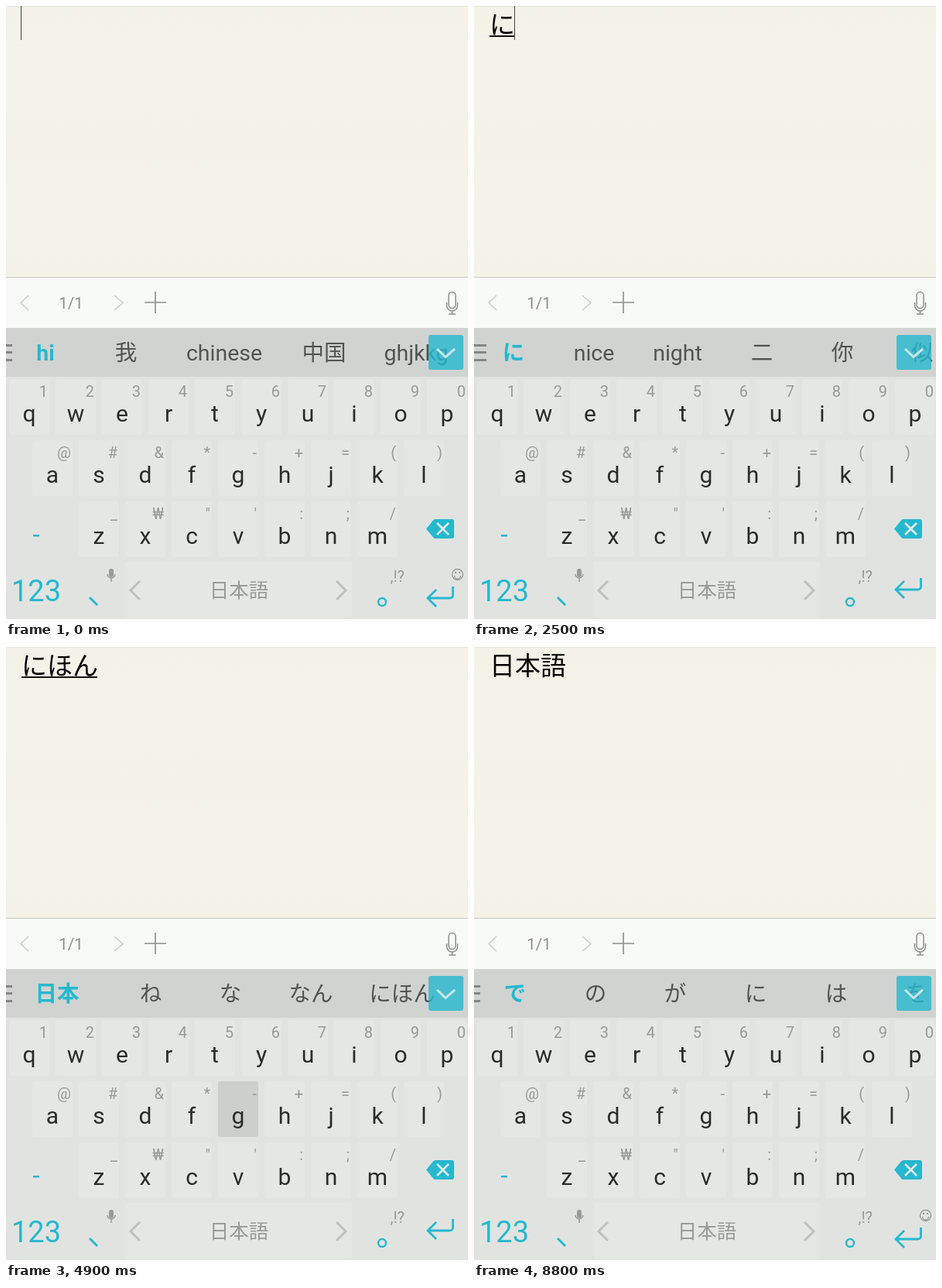
These frames come from a looping animation (597 px wide and 792 px high, 8.9 s). An HTML page with a canvas:

```html
<!DOCTYPE html>
<html lang="ja">
<head>
<meta charset="utf-8">
<title>Japanese keyboard</title>
<style>
html, body { margin: 0; width: 100%; height: 100%; overflow: hidden; }
canvas { display: block; }
</style>
</head>
<body>
<canvas width="597" height="792"></canvas>
<script>
const ctx = document.querySelector('canvas').getContext('2d');
const LOOP = 8900;
const FONT = 'Roboto, "Noto Sans CJK JP", sans-serif';
const TEAL = '#25b8cf', PALE = '#e3f1f2', GRAY = '#989a98', INK = '#2a2c2a';

// [time, value]: each value holds until the next entry
const typed = [[0, ''], [500, 'ん'], [1400, 'に'], [2900, 'にh'], [3600, 'にほ'], [4300, 'にほん'],
  [5100, 'にほんg'], [6000, 'にほんご'], [7300, '日本語']];
const candidates = [
  [0, 'hi 51 我 155 chinese 282 中国 411 ghjkkg 530'],
  [700, 'ん 53 no 158 not 261 n 366 な 469 ね 573'],
  [1500, 'に 51 nice 155 night 263 二 372 你 476 似 579'],
  [3100, '日本 66 ね 187 な 290 なん 394 ニh 499 にh 605'],
  [3700, '日本 66 ね 187 な 290 なん 394 にほ 499 ニほ 605'],
  [4400, '日本 66 ね 187 な 290 なん 394 にほん 512'],
  [5200, 'ね 53 な 159 なん 263 に 367 ニほんg 496 にほんg 646'],
  [6100, '日本語 80 ね 214 な 317 なん 421 にほんご 553'],
  [7400, 'で 53 の 157 が 260 に 364 は 468 を 572']];
const menuRight = [[0, 8], [700, 16], [3100, 8]];
// key, pressed, popup shown, released
const presses = [['n', 300, 400, 600], ['i', 1300, 1300, 1500], ['h', 2700, 2800, 3000], ['o', 3400, 3500, 3700],
  ['n', 4100, 4200, 4400], ['g', 4900, 5000, 5200], ['o', 5800, 5900, 6100]];
const caretToggles = [1000, 1400, 1900, 2400, 3400, 3600, 4100, 4300, 4700, 5100, 5500,
  6000, 6400, 6900, 7800, 8300, 8800];

const rows = [
  { x: 4, y: 482, keys: 'qwertyuiop', hints: '1234567890' },
  { x: 34, y: 561, keys: 'asdfghjkl', hints: '@#&*-+=()' },
  { x: 94, y: 640, keys: 'zxcvbnm', hints: '_₩"\':;/' }];

const valueAt = (track, t) => track.filter(([start]) => start <= t).pop()[1];

function rect(x, y, w, h, color, radius = 0) {
  ctx.fillStyle = color;
  ctx.beginPath();
  ctx.roundRect(x, y, w, h, radius);
  ctx.fill();
}

function text(string, x, y, size, color, align = 'center', weight = 400) {
  ctx.font = `${weight} ${size}px ${FONT}`;
  ctx.textAlign = align;
  ctx.fillStyle = color;
  ctx.fillText(string, x, y);
}

function stroke(path, color, width) {
  ctx.strokeStyle = color;
  ctx.lineWidth = width;
  ctx.stroke(new Path2D(path));
}

function drawPage(t) {
  const paper = ctx.createLinearGradient(0, 0, 0, 350);
  ['#f4f2e6', '#f3f3ea', '#f3f3ea', '#f4f2e6', '#f4f3e8', '#f3f3ea', '#f4f2e7']
    .forEach((color, i) => paper.addColorStop(i / 6, color));
  rect(0, 0, 597, 350, paper);
  rect(0, 0, 597, 1, '#e6e5dc');

  const string = valueAt(typed, t);
  text(string, 20, 36, 33, '#000', 'left');
  const width = Math.round(ctx.measureText(string).width);
  if (t >= 500 && t < 7300) rect(20, 38, width - 1, 2, '#111');
  if (caretToggles.filter(time => time <= t).length % 2 === 0) rect(19 + width, 0, 1, 44, '#444');
}

function drawToolbar() {
  rect(0, 350, 597, 1, '#cbccc5');
  rect(0, 351, 597, 65, '#f8faf7');
  stroke('M29 374L19 383.5L29 393M140 374L151 383.5L140 393', '#cdcfcc', 1.6);
  stroke('M179 383H207M193 369V397', '#8d8f8d', 1.6);
  text('1/1', 84, 391, 20.5, '#8d8f8d');
  stroke('M572 374a4.5 4.5 0 0 1 9 0v12a4.5 4.5 0 0 1 -9 0zM569.5 383v4a7 7 0 0 0 14 0v-4M576.5 394v4M572 398h9',
    '#8d8f8d', 1.5);
}

function drawCandidates(t) {
  rect(0, 416, 597, 63, '#d1d3d1');
  const right = valueAt(menuRight, t);
  for (const y of [437, 446, 456]) rect(right - 16, y, 16, 3, '#858785');
  const words = valueAt(candidates, t).split(' ');
  for (let i = 0; i < words.length; i += 2) {
    text(words[i], +words[i + 1], 458, 28.5, i ? '#525452' : TEAL, 'center', i ? 400 : 700);
  }
  ctx.globalAlpha = 0.8;
  rect(546, 425, 45, 45, TEAL, 3);
  ctx.globalAlpha = 1;
  stroke('M557 443L568 453.5L580 443', '#c9e6e8', 3);
}

function drawKeys(press) {
  rect(0, 479, 597, 313, '#e1e3e1');
  for (const { x, y, keys, hints } of rows) {
    [...keys].forEach((key, i) => {
      const left = x + i * 60;
      rect(left, y, 52, 72, press && press[0] === key ? '#cdcfcd' : '#e5e7e4', 4);
      text(key, left + 26, y + 55, 30, INK);
      text(hints[i], left + 50, y + 23, 20, GRAY, 'right');
    });
  }
}

function drawFunctionKeys(t) {
  rect(35, 683, 8, 2.5, TEAL);
  ctx.fillStyle = TEAL;
  ctx.fill(new Path2D('M543 675.5L552 664.5Q553 663 555 663H576Q579 663 579 666V685Q579 688 576 688H555Q553 688 552 686.5Z'));
  stroke('M557 668L572 683M572 668L557 683', PALE, 2.6);

  text('123', 7, 769, 38, TEAL, 'left');
  stroke('M108 764L118 774', TEAL, 3);
  rect(133, 727, 6, 11, GRAY, 3);
  stroke('M131 734a5 5 0 0 0 10 0M136 739v5', GRAY, 1.5);

  rect(154, 718, 293, 72, '#e5e7e4', 4);
  text('日本語', 301, 764, 25.5, GRAY);
  stroke('M173 743L161 755L173 767M427 743L439 755L427 767', '#bfc1bf', 3);
  text(',!?', 515, 744, 20, GRAY, 'right');
  stroke('M481 770a5 5 0 1 0 10 0a5 5 0 1 0 -10 0', TEAL, 2.4);

  const idle = t < 500 || t >= 7300;
  const y = idle ? 765 : 754;
  stroke(`M577.5 ${y - 15}V${y - 4}Q577.5 ${y} 573 ${y}H545M556 ${y - 11}L545 ${y}L556 ${y + 11}`, TEAL, 2.8);
  if (idle) {
    stroke('M576.5 734.5a7 7 0 1 0 14 0a7 7 0 1 0 -14 0M579.5 736a4 4 0 0 0 8 0', GRAY, 1.3);
    rect(580, 731, 2, 2, GRAY);
    rect(585, 731, 2, 2, GRAY);
  }
}

function drawPopup(key) {
  const row = rows.find(({ keys }) => keys.includes(key));
  const left = row.x - 14 + row.keys.indexOf(key) * 60;
  rect(left, row.y - 104, 80, 97, TEAL, 4);
  text(key, left + 40, row.y - 38, 46, PALE);
}

function draw(now) {
  const t = now % LOOP;
  const press = presses.find(([, down, , up]) => t >= down && t < up);
  drawPage(t);
  drawToolbar();
  drawCandidates(t);
  drawKeys(press);
  drawFunctionKeys(t);
  if (press && t >= press[2]) drawPopup(press[0]);
}

const start = performance.now();
(function tick() {
  draw(performance.now() - start);
  requestAnimationFrame(tick);
})();
</script>
</body>
</html>
```
